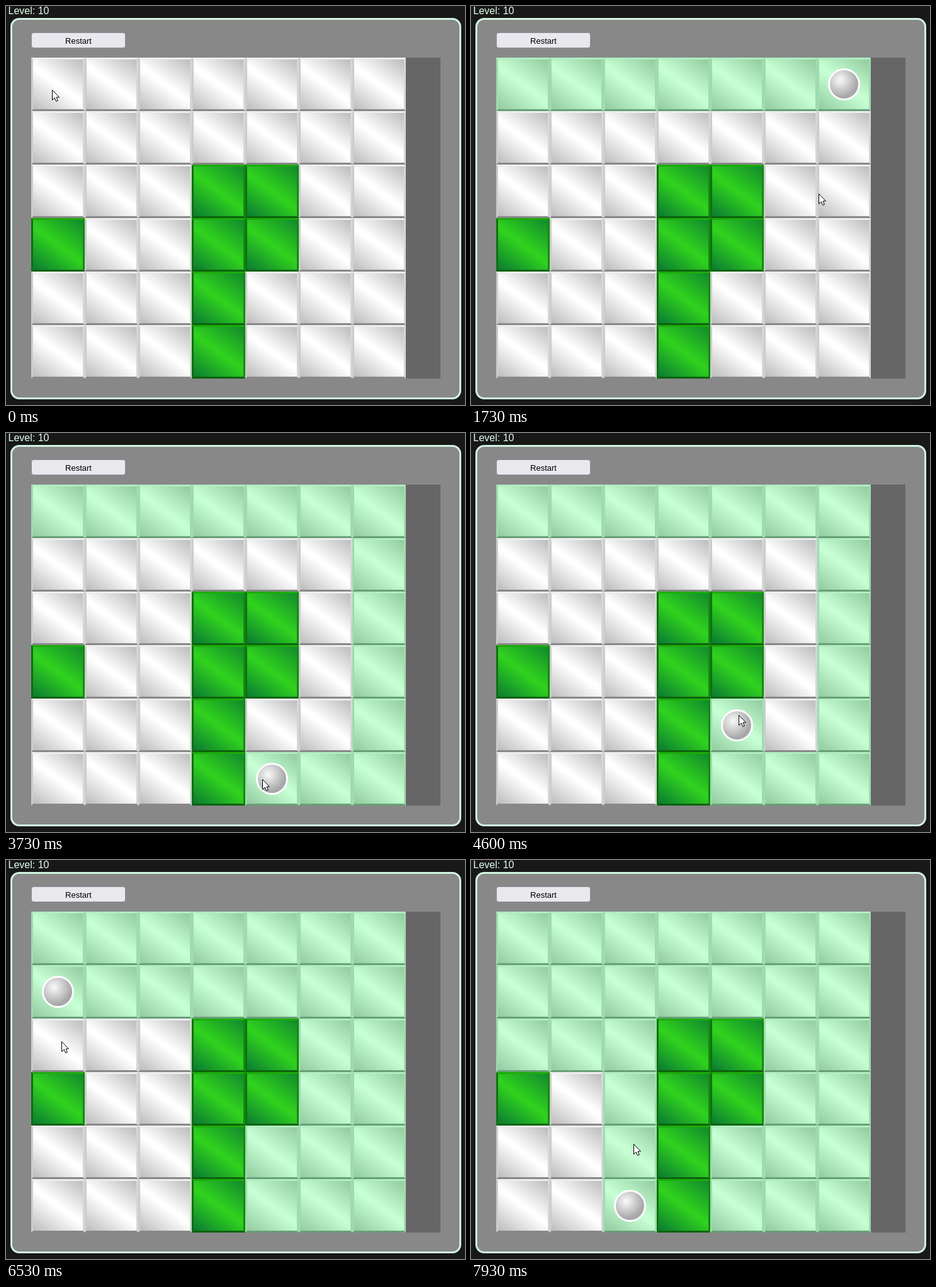
Recreate the animation shown at these times as an HTML page. Size 729 px wide and 634 px high, loop 8000 ms.

```html
<!DOCTYPE html>
<html lang="en">
<head>
<meta charset="utf-8">
<title>Tile puzzle</title>
<style>
  html, body { margin: 0; width: 100%; height: 100%; overflow: hidden; background: #181818; }
  div, svg { position: absolute; box-sizing: border-box; }
  svg { left: 0; top: 0; }
  text { font-family: Arial, "Liberation Sans", sans-serif; }
  .panel { left: 7px; top: 19px; width: 716px; height: 606px; background: #888; border: 3px solid #d0f5e2; border-radius: 14px; }
  .button { left: 40px; top: 42px; width: 150px; height: 25px; background: #e9e9ed; border: 1px solid #8f8f9d; border-radius: 4px; }
  .board { left: 40px; top: 82px; width: 650px; height: 510px; background: #666; }
  .cell {
    --edge: #bcbcbc; --shine: #fff;
    width: 85px; height: 85px; border: 3px solid;
    border-color: #eee #d6d6d6 #888 #ccc;
    background: linear-gradient(36deg, var(--edge), var(--shine) 48%, var(--shine) 52%, var(--far, var(--edge)));
  }
  .cell.done { --edge: #92cb9f; --shine: #c5ffd3; border-color: #b0eec0 #9edbae #689f78 #9edbae; }
  .cell.wall { --edge: #0a7a32; --shine: #2fd01e; --far: #128a2c; border-color: #1cac0c #128a10 #0c620c #0c720c; }
  .ball {
    width: 51px; height: 51px; border: 3px solid #fff; border-radius: 50%;
    background: radial-gradient(circle at 38% 36%, #fafafa, #a8a8a8 60%) border-box;
  }
</style>
</head>
<body>
<div class="panel"></div>
<div class="button"></div>
<div class="board" id="board"></div>
<svg width="729" height="634">
  <text x="3.5" y="13" font-size="16" fill="#e0ffee">Level: 10</text>
  <text x="115" y="60" font-size="13" text-anchor="middle" fill="#000">Restart</text>
  <path id="cursor" d="M.5 .5V16.5L4.3 13 6.7 18.5 9.3 17.4 7 12H11.5Z" fill="#fff" stroke="#000"/>
</svg>
<script>
const LOOP = 8000, FPS = 15, SIZE = 85, REST = 200, TRAVEL = 700;
const MAP = [
  ".......",
  ".......",
  "...##..",
  "#..##..",
  "...#...",
  "...#..."
];
const STEP = { right: [1, 0], left: [-1, 0], down: [0, 1], up: [0, -1] };

// Where and when the pointer clicks, and which way the ball then slides
const clicks = [
  { time: 130, x: 73, y: 133 },
  { time: 1200, x: 197, y: 129, way: "right" },
  { time: 2530, x: 614, y: 327, way: "down" },
  { time: 3670, x: 407, y: 552, way: "left" },
  { time: 4600, x: 425, y: 448, way: "up" },
  { time: 5070, x: 508, y: 458, way: "right" },
  { time: 5470, x: 503, y: 387, way: "up" },
  { time: 6130, x: 404, y: 204, way: "left" },
  { time: 6670, x: 88, y: 288, way: "down" },
  { time: 7400, x: 223, y: 280, way: "right" },
  { time: 7870, x: 264, y: 389, way: "down" },
  { time: 8130, x: 258, y: 451 }
];

const board = document.getElementById("board");
const cursor = document.getElementById("cursor");

function place(box, col, row, inset = 0) {
  box.style.left = col * SIZE + inset + "px";
  box.style.top = row * SIZE + inset + "px";
}

function addBox(name) {
  const box = document.createElement("div");
  box.className = name;
  return board.appendChild(box);
}

const cells = MAP.map((line, row) => [...line].map((mark, col) => {
  const wall = mark === "#";
  const box = addBox(wall ? "cell wall" : "cell");
  place(box, col, row);
  return { box, wall, time: Infinity };
}));
const ball = addBox("ball");

// Play the game: the ball slides until a wall, a visited cell or the edge
function playStops() {
  let col = 0, row = 0;
  cells[0][0].time = clicks[0].time;
  return clicks.map(({ time, way }) => {
    const [dx, dy] = STEP[way] || [0, 0];
    for (;;) {
      const next = cells[row + dy]?.[col + dx];
      if (!next || next.wall || next.time < Infinity) break;
      next.time = time;
      col += dx;
      row += dy;
    }
    return { time, col, row };
  });
}
const stops = playStops();

// The pointer leaves right after a click and rests before the next one
function pointerAt(t) {
  const i = clicks.findIndex(c => c.time > t);
  const to = clicks[i], from = clicks[i - 1] || to;
  const span = Math.min(TRAVEL, to.time - from.time - REST);
  const p = Math.min(1, Math.max(0, (t - from.time) / span));
  const k = p * p * (3 - 2 * p);
  return [from.x + (to.x - from.x) * k, from.y + (to.y - from.y) * k].map(Math.round);
}

function draw(time) {
  // The screen refreshes 15 times a second, on times rounded to 10 ms
  const tick = Math.floor((time + 5) * FPS / 1000);
  const t = Math.round(tick * 100 / FPS) * 10;
  for (const cell of cells.flat()) cell.box.classList.toggle("done", t >= cell.time);
  const stop = stops.filter(s => s.time <= t).pop();
  ball.style.display = stop ? "block" : "none";
  if (stop) place(ball, stop.col, stop.row, 17);
  const [x, y] = pointerAt(t);
  cursor.setAttribute("transform", `translate(${x} ${y})`);
}

const begin = performance.now();
function loop() {
  draw((performance.now() - begin) % LOOP);
  requestAnimationFrame(loop);
}
loop();
</script>
</body>
</html>
```
